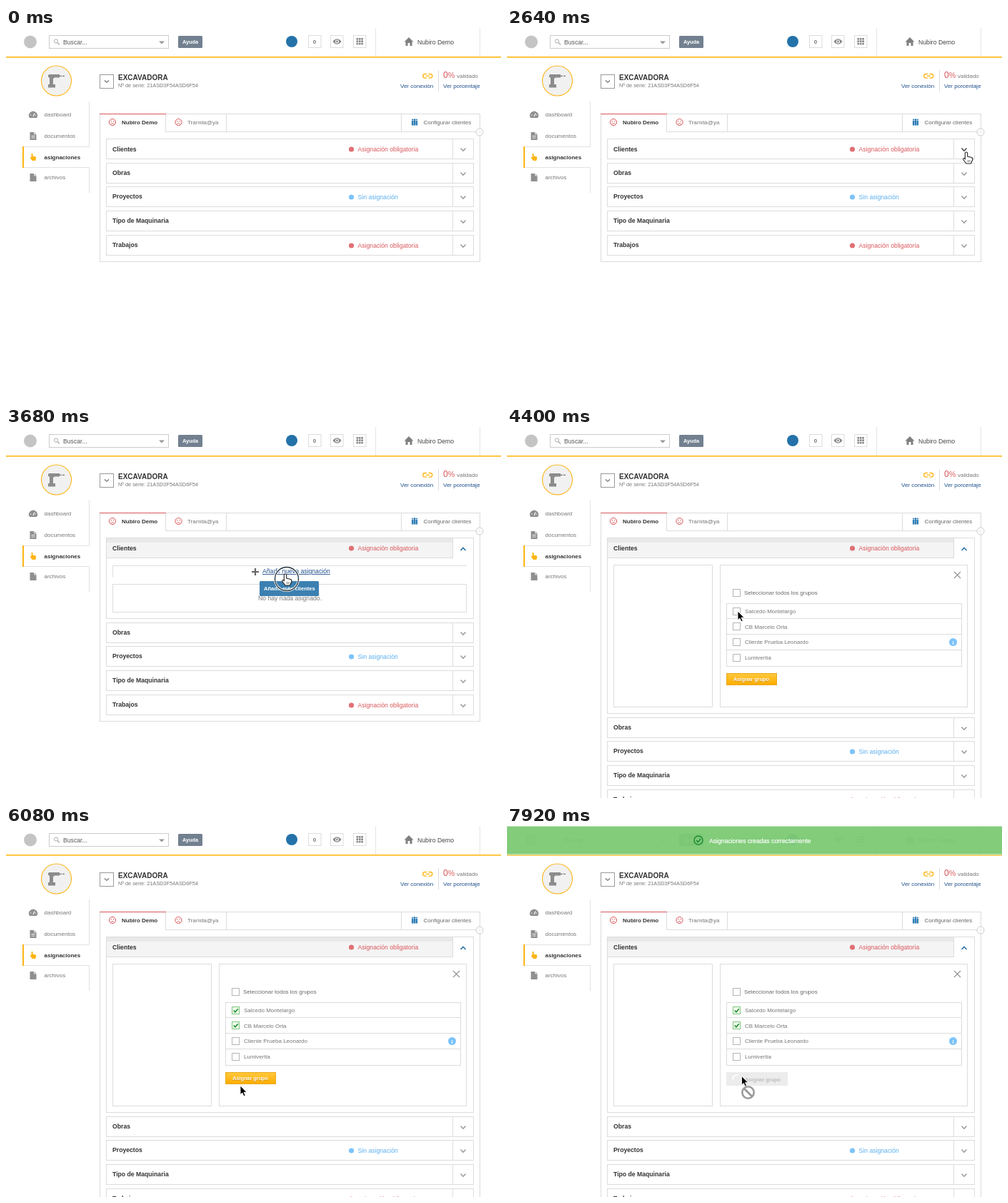
Write an HTML page that moves like this. It is 693 by 520 pixels and loops after 8 s.

```html
<!DOCTYPE html>
<html lang="es">
<head>
<meta charset="utf-8">
<title>Asignaciones</title>
<style>
html, body { margin: 0; width: 100%; height: 100%; overflow: hidden; background: #fff; }
svg { display: block; width: 693px; height: 520px; font-family: "Liberation Sans", Arial, sans-serif; }
</style>
</head>
<body>
<svg id="stage" viewBox="0 0 693 520" xmlns="http://www.w3.org/2000/svg"></svg>
<script>
const LOOP = 8000, STEP = 80;
const GREY = '#777', LINE = '#dcdcdc', DARK = '#333', RED = '#d9575b', YELLOW = '#fdb515', BLUE = '#1f4e8c', SKY = '#7cc3fa';

const text = (x, y, size, fill, str, more = '') =>
  `<text x="${x}" y="${y}" font-size="${size}" fill="${fill}" ${more}>${str}</text>`;
const bold = (x, y, size, fill, str, more = '') => text(x, y, size, fill, str, 'font-weight="700" ' + more);
const box = (x, y, w, h, fill = '#fff', stroke = LINE, more = '') =>
  `<rect x="${x}" y="${y}" width="${w}" height="${h}" fill="${fill}" stroke="${stroke}" ${more}/>`;
const fill = (x, y, w, h, color, more = '') => box(x, y, w, h, color, 'none', more);
const path = (d, stroke = LINE, width = 1, inside = 'none', more = '') =>
  `<path d="${d}" fill="${inside}" stroke="${stroke}" stroke-width="${width}" ${more}/>`;
const shape = (d, color) => path(d, 'none', 0, color);
const dot = (x, y, r, color, stroke = 'none', width = 1) =>
  `<circle cx="${x}" cy="${y}" r="${r}" fill="${color}" stroke="${stroke}" stroke-width="${width}"/>`;
const group = (id, body, more = '') => `<g id="${id}" ${more}>${body}</g>`;

function header() {
  let cells = '';
  for (let i = 0; i < 9; i++) cells += fill(490.5 + i % 3 * 3.4, 14 + Math.floor(i / 3) * 3.4, 2.6, 2.6, '#888');
  return dot(34, 19.5, 9, '#c4c4c4') +
    box(60.5, 10.5, 167, 18, '#fff', '#ccc') +
    dot(70, 18.5, 2.6, 'none', '#aaa') + path('M72 20.5L75 23.5', '#aaa', 1.2) +
    text(80, 23, 8.67, '#555', 'Buscar...') + shape('M214 18.5h8l-4 4z', '#999') +
    fill(241, 11, 34, 17, '#728090', 'rx="1.5"') + bold(247, 22, 7.33, '#fff', 'Ayuda') +
    dot(400, 19, 8, '#2472a9') +
    [423.5, 454.5, 486.5].map(x => box(x, 10.5, 17.5, 17)).join('') +
    bold(432, 21.5, 8, GREY, '0', 'text-anchor="middle"') +
    shape('M457.5 19Q463.5 11.5 469.5 19Q463.5 26.5 457.5 19', '#888') +
    dot(463.5, 19, 2.5, '#fff') + dot(463.5, 19, 1.4, '#888') + cells +
    path('M517.5 0V40M663.5 0V40', '#e6e6e6') +
    shape('M557.5 19.5L564 13l6.500 6.500h-2V25h-3v-4h-3v4h-3v-5.500z', '#808080') +
    text(576, 23, 8.67, '#444', 'Nubiro Demo') +
    fill(0, 40, 693, 1.6, '#fdb813');
}

const face = x => dot(x, 132, 4.6, 'none', RED) +
  dot(x - 1.7, 130.7, .7, RED) + dot(x + 1.7, 130.7, .7, RED) +
  path(`M${x - 2.3} 134.700q2.300-2.600 4.600 0`, RED, .9);

function title() {
  return dot(70.500, 74, 21, '#f1f1f1', YELLOW, 1.1) +
    shape('M60 65h15v4.500H68l-2 1.500v8h3v4.500h-10v-4.500h2v-9l-2-1.500v-2z', '#8c8c8c') +
    path('M75 67.300h3M79 67.300h3', '#777', 1.2) +
    box(131.5, 65.5, 19, 19, '#fff', '#999') + path('M138 73.500l3 2.800 3-2.800', '#666', 1.1) +
    bold(157, 73, 10, DARK, 'EXCAVADORA') + text(157, 83, 7.33, GREY, 'Nº de serie: 21ASD3F54ASD6F54') +
    path('M589 64.500h-2.500a2.800 2.800 0 0 0 0 5.600h2.500M591.500 64.500h2.500a2.800 2.800 0 0 1 0 5.600h-2.500M587.500 67.300h5.500', YELLOW, 1.3) +
    text(552, 84, 8, BLUE, 'Ver conexión') + path('M605.5 59V89') +
    text(612, 70, 12, RED, '0') + text(618.7, 70, 10.67, RED, '%') +
    text(631, 70, 8, GREY, 'validado') + text(612, 84, 8, BLUE, 'Ver porcentaje');
}

function sidebar() {
  const sheet = y => shape(`M33.500 ${y}h6l3 3v8h-9z`, '#8f8f8f') + path(`M39.500 ${y}v3h3`, '#fff', .8);
  return path('M116.5 103V166.5H25M25 195.5H116.5V231', '#e2e2e2') +
    fill(23, 166, 2, 30, YELLOW) +
    shape('M33 126a6 6 0 1 1 10 0z', '#8f8f8f') + path('M38 124l2-4.500', '#fff', 1.1) +
    dot(34.700, 122, .7, '#fff') + dot(41.300, 122, .7, '#fff') +
    sheet(146) + path('M35.500 151.500h5M35.500 154h5', '#fff', .9) + sheet(204) +
    shape('M35.500 176.500q1-1.500 2 0v3l4 1q1 .5 .7 2l-1 3.500h-4.500l-3-4q0-1.500 1.800-.8z', YELLOW) +
    text(53.5, 124, 8, GREY, 'dashboard') + text(53.5, 154, 8, GREY, 'documentos') +
    bold(53.5, 183.5, 8, DARK, 'asignaciones') + text(53.5, 212, 8, GREY, 'archivos');
}

function tabs() {
  const person = (x, r) => dot(x, 128.500, r, '#2f7db5') + fill(x - r, 130, r * 2, 6.500, '#2f7db5');
  return path('M131 120.5H663.5V146M223.5 121V145.5H664M308.5 121V145M553.5 121V145') +
    path('M131 120.5H224', RED, 1.2) +
    face(149) + bold(162, 134.5, 8, DARK, 'Nubiro Demo') +
    face(241.5) + text(254, 134.5, 8, GREY, 'Tramita@ya') +
    person(569, 1.1) + person(572, 1.5) + person(575, 1.1) +
    text(584.5, 134.5, 8, '#666', 'Configurar clientes') +
    dot(663, 146, 5, '#fff', '#ccc') + path('M660 146h6M663 143v6', '#eee');
}

const status = (y, kind) => {
  if (!kind) return '';
  const must = kind === 'must';
  return dot(483.5, y + 15, 3.6, must ? '#e07074' : SKY) +
    text(492.5, y + 17.5, 8.67, must ? RED : '#5aaeee', must ? 'Asignación obligatoria' : 'Sin asignación');
};
const chevron = (y, up, color, id = '') =>
  path(up ? `M636.500 ${y + 2}l3.500-3.700 3.500 3.700` : `M636.500 ${y - 1.500}l3.500 3.700 3.500-3.700`, color, 1.5, 'none', id);
const row = (y, name, kind) => box(140.5, y + .5, 514, 28) + path(`M625.500 ${y}v29`) +
  bold(149, y + 17.3, 8.67, DARK, name) + status(y, kind) + chevron(y + 15, false, '#999');

function clients() {
  return `<rect id="card" x="140.5" y="155.5" width="514" fill="#fff" stroke="${LINE}"/>` +
    group('openHead', fill(141, 156, 484, 27, '#f4f4f4') + fill(141, 156, 484, 6, '#e9e9e9') +
      path('M141 183.5H625.500') + chevron(171, true, '#1f6ba3')) +
    chevron(170, false, '#999', 'id="closedMark"') +
    path('M625.5 156V184') + bold(149, 172.8, 8.67, DARK, 'Clientes') + status(155, 'must');
}

function emptyList() {
  return path('M149.5 210.5V194M149.5 194.500H645', '#dedede') +
    path('M344 203h10M349 198v10', '#666', 2.2) +
    text(359, 205, 8.67, BLUE, 'Añadir nueva asignación', 'text-decoration="underline"') +
    box(149.5, 220.5, 495, 39) + text(353, 243, 8.67, GREY, 'No hay nada asignado.') +
    group('tip', fill(355, 216, 83, 21, '#3c80b1', 'rx="1.500"') + bold(361, 228.500, 7.6, '#fff', 'Añadir más clientes'));
}

const tick = y => box(316.5, y + .5, 10, 10, '#f2fbf0', '#7cc77c') +
  path(`M318.700 ${y + 5.500}l2.200 2.300 3.800-4.600`, '#1f8f2d', 1.7);

function picker() {
  const names = ['Salcedo Montelargo', 'CB Marcelo Orta', 'Cliente Prueba Leonardo', 'Lumivertia'];
  const lines = names.map((name, i) => {
    const y = 252.700 + i * 21.700;
    return box(316.5, Math.round(y) + .5, 10, 10, '#fff', '#b5b5b5') + text(333, y + 8.3, 8, GREY, name);
  }).join('');
  return box(149.5, 193.5, 138, 199) + box(298.5, 193.5, 346, 199) +
    path('M626 203l9 9M635 203l-9 9', '#999', 1.4) +
    box(316.5, 227.5, 10, 10, '#fff', '#b5b5b5') + text(332, 235.3, 8, '#666', 'Seleccionar todos los grupos') +
    box(307.5, 247.5, 329, 88) + path('M308 268.5H636M308 290.5H636M308 312.5H636') + lines +
    dot(624.5, 301.5, 5.5, SKY) + bold(624.5, 304.5, 8, '#fff', 'i', 'text-anchor="middle"') +
    group('tick1', tick(253)) + group('tick2', tick(274)) +
    group('ready', box(307.5, 345.5, 70, 16, 'url(#gold)', '#e9a81c') +
      bold(317, 356.300, 7.33, '#fff', 'Asignar grupo', 'style="text-shadow:0 1px 1px #c98a10"')) +
    group('busy', fill(307, 345, 86, 19, '#ececec') + bold(333, 358, 7.33, '#bdbdbd', 'Asignar grupo') +
      group('spin', path('M316.500 354a5 5 0 0 1 9-3', '#fff', 1.5)));
}

const banner = () => fill(0, 0, 693, 39, '#7dca75', 'opacity=".96"') + fill(0, 39, 693, 1.5, '#b9dfb0', 'opacity=".55"') +
  dot(268, 19.5, 6, 'none', '#1c8b35', 1.5) + path('M265 19.500l2.300 2.500 4-4.500', '#1c8b35', 1.6) +
  text(283, 23.5, 8.67, '#fff', 'Asignaciones creadas correctamente', 'stroke="#fff" stroke-width=".2"');

const cursor = () =>
  group('ring', dot(2, 7, 16.5, 'none', '#fff', 3) + dot(2, 7, 16.5, 'none', '#26333d', 1.3)) +
  group('hand', path('M-1.700 1Q0-1 1.700 1V6l5 1.300q2.600.6 2.300 3.200L7.700 13 6.500 16H0L-4 10.800Q-4.800 8.300-2.800 8.500L-1.700 9.700z', '#222', 1.1, '#fff') +
    path('M2.500 11v3M4.800 11v3', '#444', .8)) +
  group('arrow', path('M0 0V12.500L2.800 10 5 14.700 7.200 13.700 5 9.200H9z', '#fff', .9, '#000')) +
  group('stop', dot(9, 23, 8.2, '#fff', '#999', 2.600) + path('M3.500 17.500L14.500 28.500', '#999', 2.800) +
    dot(9, 23, 9.700, 'none', '#ddd', .5));

const stage = document.getElementById('stage');
stage.innerHTML =
  `<defs><linearGradient id="gold" x2="0" y2="1"><stop stop-color="#ffc93c"/><stop offset="1" stop-color="#fdac00"/></linearGradient></defs>` +
  header() + title() + sidebar() +
  `<rect id="panel" x="131.5" y="120.5" width="532" fill="none" stroke="${LINE}"/>` +
  tabs() + clients() + group('empty', emptyList()) + group('picker', picker()) +
  group('rows', row(189, 'Obras') + row(222, 'Proyectos', 'none') + row(256, 'Tipo de Maquinaria') + row(290, 'Trabajos', 'must')) +
  group('banner', banner()) + group('cursor', cursor());

const el = {};
stage.querySelectorAll('[id]').forEach(node => el[node.id] = node);

// Pointer stops: time, x, y
const stops = [
  [880, 697, 462], [1760, 650, 195], [2160, 643, 174], [2800, 643, 174], [3360, 391, 206], [3920, 391, 206],
  [4400, 323, 258], [4960, 323, 258], [5200, 323, 279], [5520, 323, 279], [5920, 326, 360],
  [6080, 328, 364], [6240, 328, 357], [7520, 328, 357], [7840, 328.500, 350.500]
];
const rings = [[2720, 2880], [3680, 3760], [4800, 4960], [5280, 5360], [6560, 6720]];
const hands = [[2080, 2960], [3280, 3760], [6240, 6720]];

const within = (t, spans) => spans.some(([a, b]) => t >= a && t < b);
const ease = p => p * p * (3 - 2 * p);
const show = (node, on) => node.setAttribute('visibility', on ? 'inherit' : 'hidden');
const move = (node, x, y) => node.setAttribute('transform', `translate(${x} ${y})`);

function pointer(t) {
  const i = stops.findIndex(s => s[0] > t);
  if (i < 0) return stops[stops.length - 1].slice(1);
  if (i === 0) return stops[0].slice(1);
  const [t0, x0, y0] = stops[i - 1], [t1, x1, y1] = stops[i];
  const p = ease((t - t0) / (t1 - t0));
  return [x0 + (x1 - x0) * p, y0 + (y1 - y0) * p];
}

function draw(t) {
  const open = t >= 2720, picking = t >= 3760, busy = t >= 6720;
  const grow = picking ? 218 : open ? 85 : 0;
  el.panel.setAttribute('height', 207 + grow);
  el.card.setAttribute('height', 28 + grow);
  move(el.rows, 0, grow);
  show(el.openHead, open);
  show(el.closedMark, !open);
  el.closedMark.setAttribute('stroke', t >= 2080 ? '#444' : '#999');
  show(el.empty, open && !picking);
  show(el.tip, open && !picking && t >= 3360);
  show(el.picker, picking);
  show(el.tick1, picking && t >= 4880);
  show(el.tick2, picking && t >= 5360);
  show(el.ready, picking && !busy);
  show(el.busy, busy);
  el.spin.setAttribute('transform', `rotate(${t * .36 % 360} 321.5 354)`);

  const drop = ease(Math.min(1, Math.max(0, (t - 6960) / 480)));
  move(el.banner, 0, -41 + 41.500 * drop);
  show(el.banner, t > 6960);

  const hand = within(t, hands);
  show(el.cursor, t >= 960);
  move(el.cursor, ...pointer(t));
  show(el.hand, hand);
  show(el.arrow, !hand);
  show(el.ring, within(t, rings));
  show(el.stop, busy);
}

const start = performance.now();
function tickFrame() {
  const t = (performance.now() - start) % LOOP;
  draw(Math.floor(t / STEP) * STEP);
  requestAnimationFrame(tickFrame);
}
draw(0);
requestAnimationFrame(tickFrame);
</script>
</body>
</html>
```
